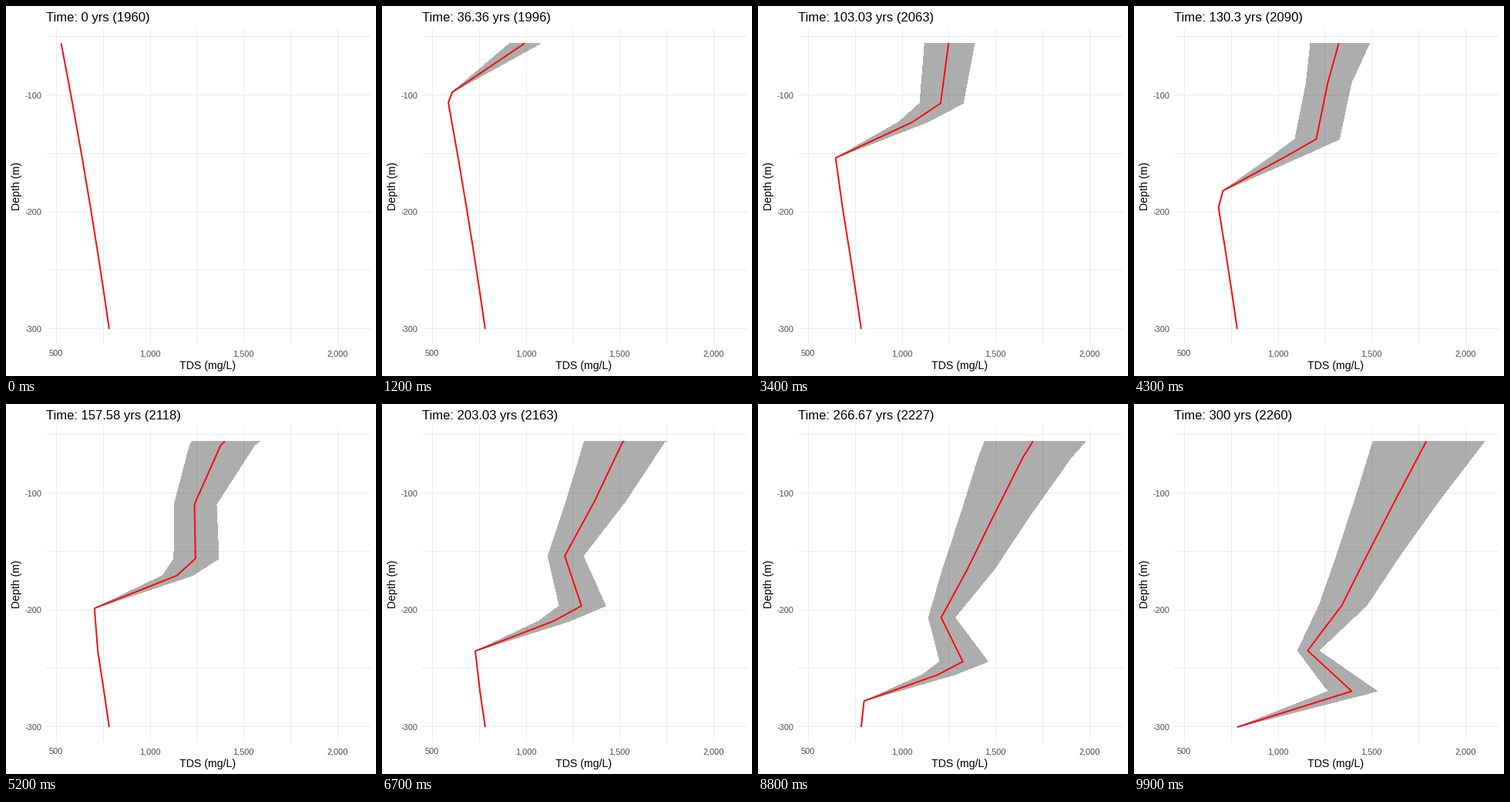
A matplotlib script for the animation above (10 s loop, 480 by 480 pixels).

```python
import numpy as np
import matplotlib.pyplot as plt
from matplotlib.animation import FuncAnimation

plt.rcParams["font.family"] = ["Liberation Sans", "DejaVu Sans"]

FRAMES, SPAN, STEP = 100, 300, 50
PX = 0.9  # points per pixel at 80 dpi

# Water entering at the surface: TDS and spread, and how both drift per year
YEAR = [0, 50, 100, 150, 250, 300]
SALT = [523, 1165, 1237, 1375, 1650, 1788]
SPREAD = [0, 107, 127, 166, 244, 284]
DRIFT = [0, 0.90, -0.41, -0.25, -0.58, -0.58]
FADE = [0, 0.07, -0.37, -0.30, -0.58, -0.58]
MIXING = {0: 1, 50: -1, 100: 1}  # layers that trade salt between steps

fig = plt.figure(figsize=(6, 6), dpi=80, facecolor="white")
ax = fig.add_axes([0, 0, 1, 1])
ax.set(xlim=(0, 480), ylim=(480, 0))
ax.axis("off")


def px(tds):
    return 66 + 0.2432 * (np.asarray(tds) - 500)


def py(depth):
    return 115.8 + 1.516 * (np.asarray(depth) - 100)


def label(x, y, text, size, color="black", **kw):
    return ax.text(x, y, text, fontsize=size * PX, color=color, **kw)


def grid(xs, ys):
    ax.plot(xs, ys, color="#EBEBEB", lw=PX, snap=False, solid_capstyle="butt")


for i in range(7):
    x = int(65.5 + 60.8 * i) + 0.5
    grid([x, x], [29, 438])
for i in range(6):
    y = int(39.7 + 75.8 * i) + 0.5
    grid([52, 473], [y, y])
for i in range(4):
    label(65.2 + 121.6 * i, 454, f"{500 + 500 * i:,}", 11, "#4D4D4D", ha="center")
for i in range(3):
    label(46.5, 119.7 + 151.7 * i, f"-{100 + 100 * i}", 11, "#4D4D4D", ha="right")
label(261.7, 471.5, "TDS (mg/L)", 14.1, ha="center")
label(18, 233.5, "Depth (m)", 14.1, rotation=90, rotation_mode="anchor", ha="center")
title = label(51.5, 20, "", 16.7)


def sink(age):
    """Depth in metres reached after some years."""
    return 55.5 + 1.057 * age - 0.0008055 * age ** 2


def native(depth):
    """TDS of the undisturbed profile."""
    u = (depth - 55.5) / 244.5
    return 523 + 256 * u + 38 * u * (1 - u)


def profile(t):
    """Rows of depth, TDS and spread from the surface down."""
    step, phase = divmod(t / STEP, 1)
    moved = STEP * (step + phase * phase * (3 - 2 * phase))
    mix = 41 * np.sin(np.pi * phase)

    rows = [(sink(0), np.interp(t, YEAR, SALT), np.interp(t, YEAR, SPREAD))]
    for s in range(STEP * int(step), 0, -STEP):
        age = moved - s
        tds = np.interp(s, YEAR, SALT) + np.interp(s, YEAR, DRIFT) * age
        spread = np.interp(s, YEAR, SPREAD) + np.interp(s, YEAR, FADE) * age
        rows.append((sink(age), tds + MIXING.get(s, 0) * mix, spread))

    depth = sink(moved)
    front = np.array([depth, native(depth) + MIXING[0] * mix, 0])
    if t > STEP:
        # The mixing zone swells briefly after each step
        x = phase * STEP / 8
        knee = np.array(rows[-1]) * 0.66 + front * 0.34
        knee[1] += 85 * (x * np.exp(1 - x)) ** 2
        rows.append(knee)
    rows.append(front)

    for age in range(STEP * (int(step) + 1), SPAN + 1, STEP):
        rows.append((sink(age), native(sink(age)), 0))
    return np.array(rows).T


band, = ax.fill([0, 0, 0], [0, 0, 0], color="#333333", alpha=0.4, lw=0,
                antialiased=False, zorder=3)
curve, = ax.plot([], [], color="red", lw=1.9 * PX, solid_capstyle="butt",
                 solid_joinstyle="round", zorder=4)


def draw(frame):
    t = SPAN * frame / (FRAMES - 1)
    title.set_text(f"Time: {round(t, 2):g} yrs ({round(1960 + t)})")
    depth, tds, spread = profile(t)
    y = py(depth)
    low, high = px(tds - spread), px(tds + 1.09 * spread)
    band.set_xy(np.column_stack([np.r_[low, high[::-1]], np.r_[y, y[::-1]]]))
    curve.set_data(px(tds), y)
    return title, band, curve


anim = FuncAnimation(fig, draw, frames=FRAMES, interval=100, repeat=True, repeat_delay=0)
plt.show()
```
